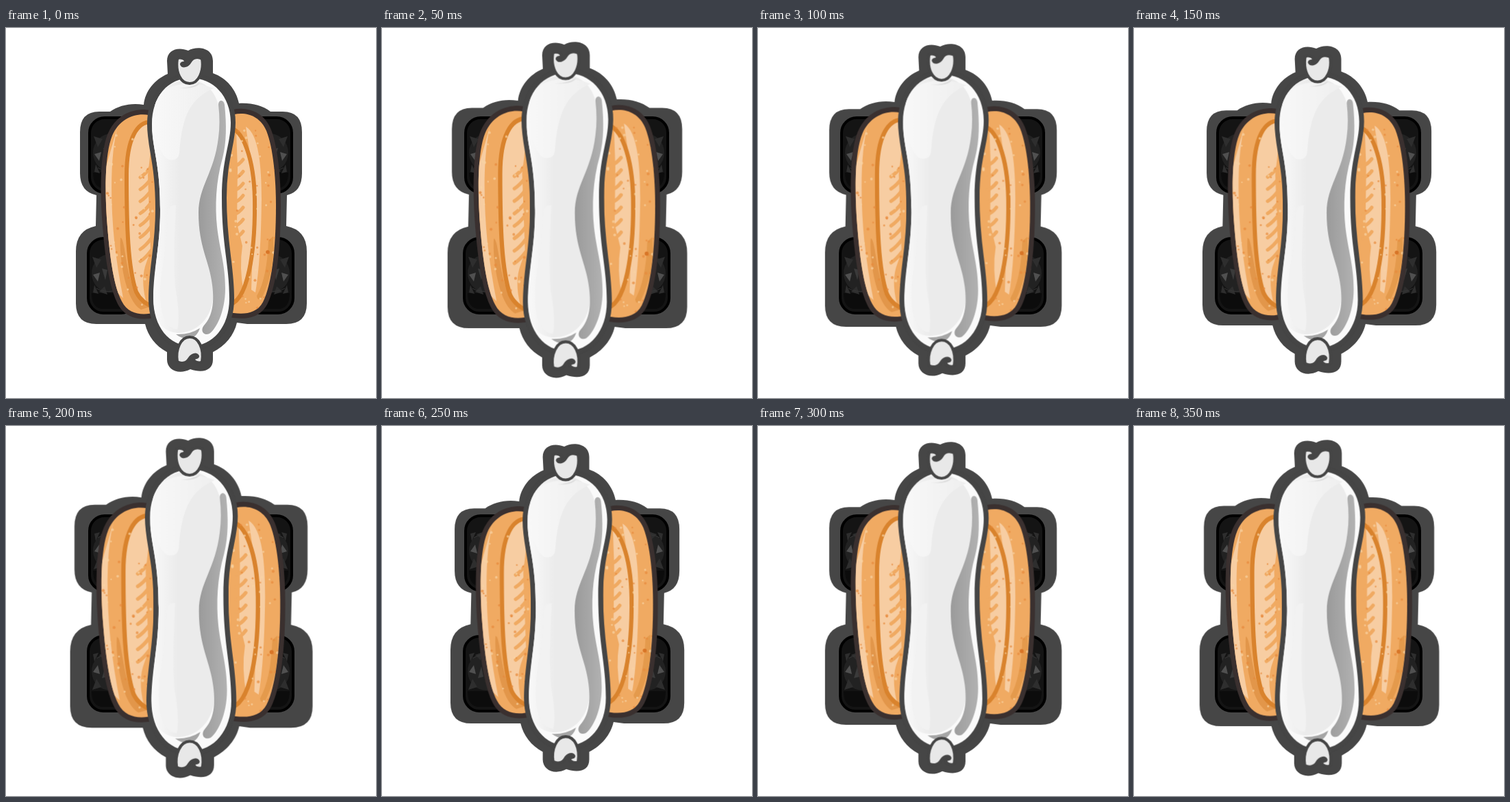
Animation of 540x540 px, one loop 0.4 s. Source, as an HTML page:

```html
<!DOCTYPE html>
<html lang="en">
<head>
<meta charset="utf-8">
<title>Pulsing hot dog car</title>
<style>
  html, body { margin: 0; width: 100%; height: 100%; overflow: hidden; background: #fff; }
  svg { display: block; width: 100vw; height: 100vh; }
  .pulse { transform-origin: 270px 266px; animation: pulse 400ms step-end infinite; }
  .tread-a { animation: blink 400ms step-end infinite; }
  .tread-b { animation: blink 400ms step-end -200ms infinite; }
  /* Triangle wave, three cycles per loop, held for 50 ms at a time */
  @keyframes pulse {
    0%    { transform: scale(1); }
    12.5% { transform: scale(1.0375); }
    25%   { transform: scale(1.025); }
    37.5% { transform: scale(1.0125); }
    50%   { transform: scale(1.05); }
    62.5% { transform: scale(1.0125); }
    75%   { transform: scale(1.025); }
    87.5% { transform: scale(1.0375); }
  }
  @keyframes blink { 0% { opacity: 1; } 50%, 100% { opacity: 0; } }
  .outlined { paint-order: stroke; stroke-width: 14; stroke-linejoin: round; }
  .bun { fill: #f0aa62; stroke: #3a302f; }
  .crumb { fill: #f7cda2; }
  .ring { fill: none; stroke: #d9832d; stroke-width: 6; }
  .slash { fill: none; stroke: #f0aa62; stroke-width: 5; stroke-linecap: round; }
  .knot { fill: #e8e8e8; stroke: #454545; stroke-width: 4; stroke-linejoin: round; }
</style>
</head>
<body>
<svg viewBox="0 0 540 540">
  <defs>
    <path id="leftBun" d="M218 130C198 121 168 127 155 157C144 184 144 240 148 290C152 340 158 378 169 399C179 419 201 420 218 415Z"/>
    <path id="rightBun" d="M322 130C342 120 369 124 380 150C390 175 394 220 394 260C394 320 388 374 375 400C365 419 342 419 322 414Z"/>
    <path id="casing" d="M270 73C302 73 328 99 328 138C328 170 315 190 315 248C315 318 326 345 326 395C326 436 302 464 270 464C238 464 215 436 215 395C215 350 225 322 225 265C225 195 213 176 213 140C213 100 237 73 270 73Z"/>
    <path id="knot" class="knot" d="M250 45C247 65 255 81 268 81C281 81 289 63 286 45C281 42 273 42 269 49C265 56 258 57 256 53C256 50 260 52 262 49C262 44 253 42 250 45Z"/>
    <clipPath id="leftClip"><use href="#leftBun"/></clipPath>
    <clipPath id="rightClip"><use href="#rightBun"/></clipPath>
    <clipPath id="casingClip"><use href="#casing"/></clipPath>
    <linearGradient id="shine">
      <stop offset="0" stop-color="#fafafa"/>
      <stop offset=".4" stop-color="#ebebeb"/>
      <stop offset="1" stop-color="#ebebeb"/>
    </linearGradient>
    <linearGradient id="gloss">
      <stop offset="0" stop-color="#f8f8f8"/>
      <stop offset="1" stop-color="#efefef"/>
    </linearGradient>
    <linearGradient id="shade">
      <stop offset="0" stop-color="#9b9b9b"/>
      <stop offset="1" stop-color="#b2b2b2"/>
    </linearGradient>
    <g id="tread">
      <path fill="#2e2e2e" d="M-24-27l13 4-7 12zM-14 24l8-8 4 12zM-21 14l6 13-8-2z"/>
      <path fill="#3a3a3a" d="M-10-10l8 2-3 15z"/>
      <path fill="#505050" d="M-23-1l10-3-3 13z"/>
      <path fill="none" stroke="#363636" d="M-18 19Q-8 25 6 23"/>
    </g>
    <g id="wheel">
      <rect x="-30" y="-54" width="70" height="109" rx="22" fill="#141414" stroke="#000" stroke-width="4"/>
      <path fill="#0c0c0c" d="M-25 26h55v23h-38q-17 0-17-23z"/>
      <ellipse cx="2" cy="-3" rx="27" ry="28" fill="#222"/>
      <use class="tread-a" href="#tread"/>
      <use class="tread-b" href="#tread" transform="matrix(1 0 0 -1 0 -3)"/>
    </g>
  </defs>

  <path class="pulse" fill="#464646" d="M235 48C235 31 252 27 266 33C278 26 302 28 302 48V66C322 73 336 90 340 110C358 109 374 113 386 122H404Q432 122 432 152V212Q432 239 410 244L409 289Q439 295 439 326V402Q439 432 409 432H352L337 430C333 448 320 464 302 473V484C302 500 287 504 269 498C252 507 235 499 235 484V473C218 464 207 449 203 432H132Q102 432 102 402V326Q102 295 131 289L132 244Q108 239 108 212V152Q108 122 136 122H152C165 113 182 109 201 112C203 92 217 75 236 67Z"/>

  <use href="#wheel" transform="translate(152 185)"/>
  <use href="#wheel" transform="translate(150 361)"/>
  <use href="#wheel" transform="matrix(-1 0 0 1 387 185)"/>
  <use href="#wheel" transform="matrix(-1 0 0 1 389 361)"/>

  <g class="pulse">
    <use href="#leftBun" class="bun outlined"/>
    <g clip-path="url(#leftClip)">
      <path class="crumb" d="M164 140C152 180 152 250 158 310Q163 355 171 394L150 375L138 230Z"/>
      <path fill="#e2964a" d="M167 306C173 306 174 345 184 374Q192 399 210 407L197 411C174 398 165 335 167 306Z"/>
      <path class="crumb" d="M218 139C190 131 177 165 177 215C177 290 179 350 191 385L204 398Q196 365 205 342L211 325L207 215L211 180Z"/>
      <path class="ring" d="M219 138C190 131 176 165 176 215C176 290 178 350 190 385Q198 402 218 408"/>
      <g id="leftSlashes" class="slash"></g>
      <g id="leftSpecks"></g>
    </g>

    <use href="#rightBun" class="bun outlined"/>
    <g clip-path="url(#rightClip)">
      <path class="crumb" d="M350 144C369 155 373 202 373 250Q372 340 364 386L358 382L363 230Z"/>
      <path fill="#e49a4c" d="M390 304Q394 350 374 393Q367 400 366 391Q381 365 383 310Z"/>
      <path class="crumb" d="M336 150C356 159 363 208 363 250C363 310 357 360 347 386Q340 350 345 318L337 285L338 205Z"/>
      <path class="ring" d="M322 146C347 143 362 195 363 250C364 322 354 404 322 404"/>
      <g id="rightSlashes" class="slash"></g>
      <g id="rightSpecks"></g>
    </g>

    <use href="#casing" class="outlined" fill="#fafafa" stroke="#454545"/>
    <g clip-path="url(#casingClip)">
      <path fill="url(#shine)" d="M218 105C230 78 257 75 278 77C302 85 315 105 313 150C310 205 282 220 282 270C282 320 303 345 303 382C303 425 278 445 250 445C221 443 215 415 215 390L225 270L213 150Z"/>
      <path fill="url(#gloss)" d="M218 105C233 79 273 76 303 88C270 103 257 126 253 183Q251 195 237 192C220 182 214 140 218 105Z"/>
      <path fill="#f2f2f2" d="M236 272Q237 257 248 259C246 305 244 335 247 378Q255 424 250 440C226 437 222 400 227 358Q235 310 236 272Z"/>
      <path fill="url(#shade)" d="M310 112C310 104 318 104 319 112C322 142 322 166 316 190C306 225 305 260 308 290C312 325 320 345 320 380C320 415 306 440 297 446C288 450 283 441 289 434C302 420 304 399 301 375C297 340 281 320 281 270C281 230 304 212 310 160Q313 138 310 112Z"/>
      <path fill="#a6a6a6" d="M248 447Q268 448 283 438Q280 448 271 453Q258 455 248 447Z"/>
      <path fill="#dedede" d="M249 87Q267 89 283 80Q278 90 249 87Z"/>
    </g>
    <use href="#knot"/>
    <use href="#knot" transform="rotate(180 268 266)"/>
  </g>
</svg>
<script>
  const add = (parent, tag, attrs) => {
    const node = document.createElementNS('http://www.w3.org/2000/svg', tag);
    for (const [key, value] of Object.entries(attrs)) node.setAttribute(key, value);
    document.getElementById(parent).append(node);
  };

  const randomFrom = seed => () => (seed = seed * 16807 % 2147483647) / 2147483647;

  function sprinkle(parent, left, right, seed) {
    const random = randomFrom(seed);
    for (let i = 0; i < 70; i++) {
      add(parent, 'circle', {
        cx: left + random() * (right - left),
        cy: 132 + random() * 278,
        r: 1.1 + random(),
        fill: i % 2 ? '#fad5a4' : '#e88b3c',
        opacity: 0.7
      });
    }
  }

  for (let i = 0; i < 8; i++) {
    const y = 218 + i * 17.5;
    add('leftSlashes', 'path', { d: `M196 ${y}Q204 ${y - 5} 212 ${y - 16}` });
    if (i < 7) add('rightSlashes', 'path', { d: `M333 ${y - 16}Q340 ${y - 18} 346 ${y - 26}` });
  }
  sprinkle('leftSpecks', 148, 216, 41);
  sprinkle('rightSpecks', 324, 394, 97);
  add('rightSpecks', 'circle', { cx: 382, cy: 327, r: 2.8, fill: '#d87527' });
</script>
</body>
</html>
```
